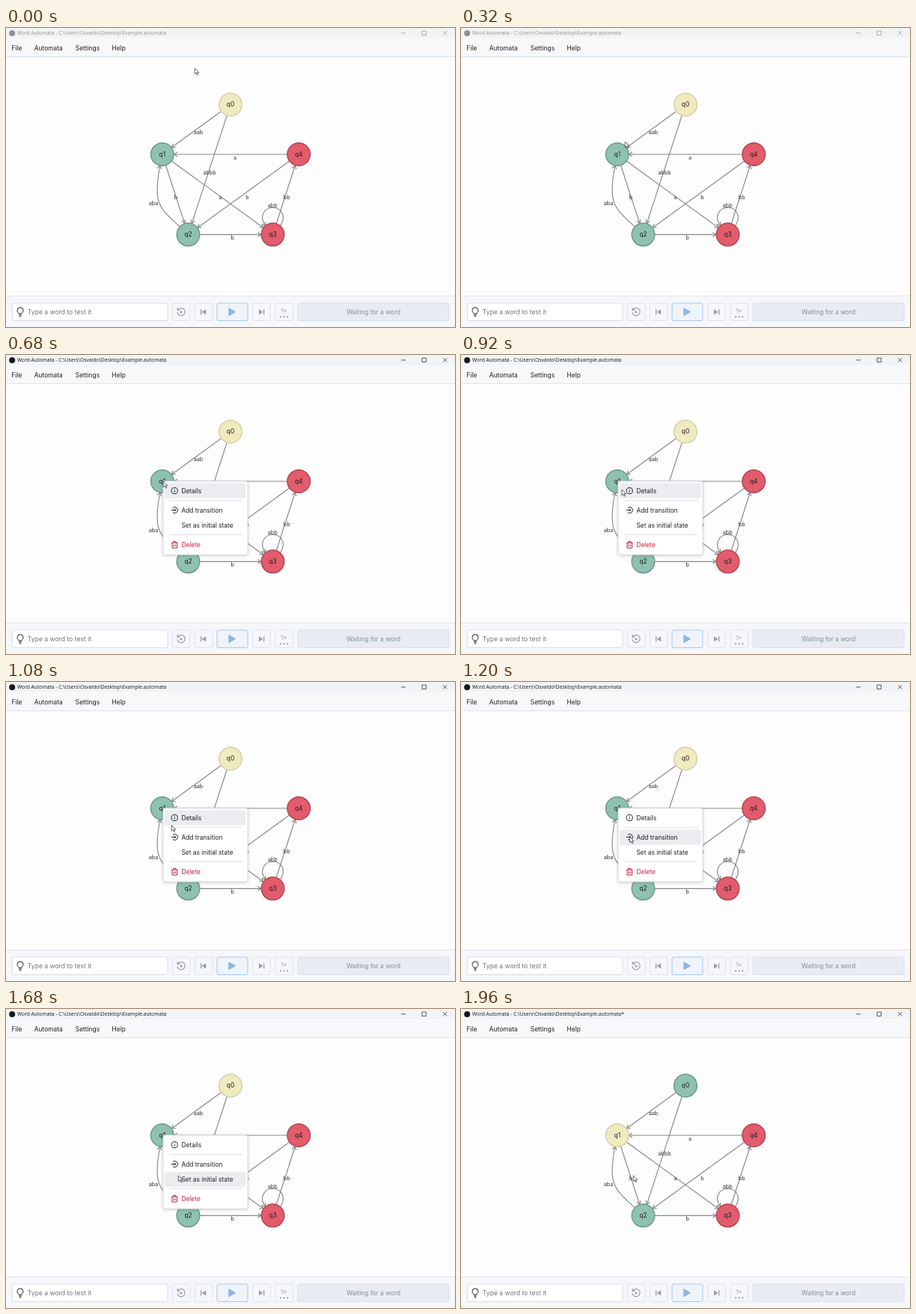
These frames come from a looping animation (600x400 px, 2120 ms). An HTML page:

```html
<!DOCTYPE html>
<html lang="en">
<head>
<meta charset="utf-8">
<title>Word Automata</title>
<style>
  html, body { margin: 0; width: 100%; height: 100%; overflow: hidden; background: #fefdfe; }
  svg { display: block; width: 600px; height: 400px; font: 8.4px Inter, sans-serif; fill: none; }
  text { fill: #1c1e21; }
  .mid { text-anchor: middle; }
  .bar { fill: #f2f3f5; color: #8f9092; }
  .bar.active { color: #17181a; }
  .bar text { font: 6.72px "Open Sans", "Noto Sans", sans-serif; fill: currentColor; }
  .ctl { stroke: currentColor; stroke-width: .7; fill: none; }
  .btn { fill: #f6f7fa; stroke: #dfe3e9; }
  .off { stroke: #989ca3; }
  .dim { fill: #989ca3; }
  .edge { stroke: #87878a; stroke-width: 1.15; }
  .label { font-size: 7.3px; fill: #303236; text-anchor: middle; }
  .node { stroke-width: 1.5; }
  .initial { fill: #f0ebbe; stroke: #d5cfa9; }
  .plain { fill: #8fc1b2; stroke: #6b9a8b; }
  .final { fill: #e25c6b; stroke: #b54554; }
  .icon { stroke: #202226; stroke-width: 1; }
  .red { stroke: #c51f3c; }
  text.red { fill: #c51f3c; stroke: none; }
  .panel { fill: #fff; stroke: #d3d6dc; stroke-width: .8; filter: drop-shadow(0 1px 2px rgba(40, 45, 55, .22)); }
  .rule { stroke: #dcdee3; stroke-width: .9; }
</style>
</head>
<body>
<svg viewBox="0 0 600 400">
  <rect width="600" height="400" fill="#fefdfe"/>

  <g class="bar" id="bar">
    <rect width="600" height="13.5"/>
    <circle cx="8.2" cy="7" r="4" fill="currentColor"/>
    <text id="title" x="15" y="9.4"></text>
    <path class="ctl" d="M528 6.8h6M556 4h5.4v5.4h-5.4zM584 4l5.4 5.4M589.4 4l-5.4 5.4"/>
  </g>

  <rect y="13.5" width="600" height="25" fill="#f6f8fa"/>
  <path d="M0 38.5H600" stroke="#dde3ea"/>
  <text x="7.5" y="30.4">File</text>
  <text x="37.8" y="30.4">Automata</text>
  <text x="92.8" y="30.4">Settings</text>
  <text x="141.6" y="30.4">Help</text>

  <g id="graph"></g>

  <g id="menu">
    <rect class="panel" x="210" y="168.8" width="113" height="98.4" rx="2.5"/>
    <rect id="hover" x="212" width="108.5" height="20.4" rx="2.5" fill="#ebecf0"/>
    <path class="rule" d="M219 194.5h97M219 240.5h97"/>
    <g class="icon">
      <circle cx="225.2" cy="181.6" r="4.1"/>
      <path d="M225.2 181v2.6M225.2 179.2v.9"/>
      <path d="M223 204.4a4 4 0 1 1 0 6.2M220.8 207.5h6M225 205.6l1.9 1.9-1.9 1.9"/>
      <path class="red" d="M221 251.3h8.6M223.5 251v-1.5h3.6v1.5M222 251.5v6.7h6.6v-6.7M224.2 253.4v3M226.4 253.4v3"/>
    </g>
    <text x="234.4" y="184.5">Details</text>
    <text x="234.4" y="210.5">Add transition</text>
    <text x="234.4" y="230.9">Set as initial state</text>
    <text class="red" x="234.4" y="257">Delete</text>
  </g>

  <rect y="358" width="600" height="42" fill="#f5f7fa"/>
  <path d="M0 358.5H600" stroke="#dfe4ea"/>
  <rect x="8.5" y="368" width="207.5" height="23.5" rx="2" fill="#fff" stroke="#d9dee5"/>
  <g class="icon">
    <path d="M17 382.2c0-1.3-2-2-2-4.4a4 4 0 0 1 8 0c0 2.4-2 3.1-2 4.4z"/>
    <path d="M17.2 384h3.6M17.7 385.8h2.6"/>
  </g>
  <text x="28.8" y="382.6" style="font-size:8.6px;fill:#6d727a">Type a word to test it</text>

  <g class="btn">
    <rect x="222.5" y="368" width="23.5" height="23.5" rx="2"/>
    <rect x="252.5" y="368" width="23.5" height="23.5" rx="2"/>
    <rect x="329.8" y="368" width="23.5" height="23.5" rx="2"/>
    <rect x="360" y="368" width="23.5" height="23.5" rx="2"/>
  </g>
  <rect x="282" y="368" width="41" height="23.5" rx="2" fill="#eff4fb" stroke="#a9c6ea"/>
  <path d="M297.8 374.8v10l8.8-5z" fill="#8fb4e3" stroke="#8fb4e3" stroke-linejoin="round"/>
  <path class="off" d="M229.6 377.2a5.1 5.1 0 1 1-.6 3.2M229.2 373.9v3.6h3.6" stroke-width="1.2"/>
  <g class="dim">
    <circle cx="234" cy="380" r="1.6"/>
    <path d="M260 376.3h1.3v7.2h-1.3zM267.2 376.3v7.2l-5.4-3.6z"/>
    <path d="M344 376.3h1.3v7.2h-1.3zM338 376.3v7.2l5.4-3.6z"/>
    <circle cx="367" cy="386.4" r="1.1"/>
    <circle cx="371.6" cy="386.4" r="1.1"/>
    <circle cx="376.2" cy="386.4" r="1.1"/>
  </g>
  <text class="mid dim" x="371.3" y="381.2" style="font-size:8px;fill:#989ca3">1×</text>
  <rect x="390" y="368" width="202" height="23.5" rx="2" fill="#e8ecf2" stroke="#d9dfe7"/>
  <text class="mid" x="491" y="382.7" style="fill:#858a92">Waiting for a word</text>

  <path id="cursor" d="M0 0v7.6l1.8-1.5 1.3 2.9 1.3-.6-1.3-2.7h2.4z" fill="#fff" stroke="#33353a" stroke-width=".75" stroke-linejoin="round"/>
</svg>

<script>
const LOOP = 2120, STEP = 40;
const FOCUS = 600, MENU_OPEN = 640, MENU_CLOSE = 1800;
const TITLE = "Word Automata - C:\\Users\\Osvaldo\\Desktop\\Example.automata";

const $ = id => document.getElementById(id);
const graph = $("graph");

function add(tag, attrs, text = "") {
  const el = document.createElementNS("http://www.w3.org/2000/svg", tag);
  for (const key in attrs) el.setAttribute(key, attrs[key]);
  el.textContent = text;
  return graph.appendChild(el);
}

// Open arrowhead with its tip at x, y, pointing along angle
function arrow(x, y, angle) {
  const leg = turn => `${x - 5.2 * Math.cos(angle + turn)} ${y - 5.2 * Math.sin(angle + turn)}`;
  add("path", { class: "edge", d: `M${leg(0.6)}L${x} ${y}L${leg(-0.6)}` });
}

const states = {
  q0: [300, 102.5, "initial"],
  q1: [208.8, 169, "plain"],
  q2: [243.5, 276.3, "plain"],
  q3: [356.5, 276.3, "final"],
  q4: [391.2, 169, "final"]
};

const edges = [
  ["q0", "q1"], ["q0", "q2"], ["q4", "q1"], ["q1", "q3"],
  ["q1", "q2"], ["q4", "q2"], ["q2", "q3"], ["q3", "q4"]
];

for (const [from, to] of edges) {
  const [x1, y1] = states[from], [x2, y2] = states[to];
  const angle = Math.atan2(y2 - y1, x2 - x1);
  const x = x2 - 15.8 * Math.cos(angle), y = y2 - 15.8 * Math.sin(angle);
  add("path", { class: "edge", d: `M${x1} ${y1}L${x} ${y}` });
  arrow(x, y, angle);
}
add("path", { class: "edge", d: "M232 265.5C216 251 203 241 202.2 221C201.7 207 203.4 196 206 184" });
arrow(206, 184, -1.33);
add("path", { class: "edge", d: "M366.5 264.5C376 250 366 240.3 356.5 240.3C347 240.3 337 250 346.5 264.5" });
arrow(346.5, 264.5, 1);

const labels = [
  ["aab", 257, 139.5], ["a", 306, 173], ["abbb", 272, 193], ["b", 227, 226],
  ["a", 286.3, 226], ["b", 322.5, 226], ["bb", 375.2, 226],
  ["abb", 356.3, 237], ["aba", 197, 234.3], ["b", 302.7, 280]
];
for (const [text, x, y] of labels) add("text", { class: "label", x, y: y + 2.5 }, text);

const discs = {};
for (const name in states) {
  const [cx, cy, kind] = states[name];
  discs[name] = add("circle", { class: "node " + kind, cx, cy, r: 15.3 });
  add("text", { class: "mid", x: cx, y: cy + 2.9 }, name);
}

// Pointer path: time, x, y
const path = [
  [0, 252.3, 53.8], [40, 251.5, 56], [120, 244, 80], [240, 227, 131], [320, 219.3, 152],
  [440, 212, 165], [560, 210.3, 169], [760, 210.3, 169], [920, 215, 180], [1080, 221.3, 191.5],
  [1200, 225.5, 207], [1360, 228.5, 215], [1520, 230, 221], [1680, 230.3, 222.8], [LOOP, 230.3, 222.8]
];

function pointer(t) {
  const i = path.findIndex(p => p[0] > t);
  const [t0, x0, y0] = path[i - 1], [t1, x1, y1] = path[i];
  const k = (t - t0) / (t1 - t0);
  return [x0 + (x1 - x0) * k, y0 + (y1 - y0) * k];
}

function paint(now) {
  const t = Math.floor(now % LOOP / STEP) * STEP;
  const [x, y] = pointer(t);
  const changed = t >= MENU_CLOSE;
  $("cursor").setAttribute("transform", `translate(${x} ${y})`);
  $("bar").classList.toggle("active", t >= FOCUS);
  $("title").textContent = TITLE + (changed ? "*" : "");
  $("menu").style.display = t >= MENU_OPEN && !changed ? "" : "none";
  $("hover").setAttribute("y", y < 195 ? 171.4 : y < 218 ? 197.4 : 217.8);
  discs.q0.setAttribute("class", "node " + (changed ? "plain" : "initial"));
  discs.q1.setAttribute("class", "node " + (changed ? "initial" : "plain"));
}

function tick() {
  paint(performance.now());
  requestAnimationFrame(tick);
}
tick();
</script>
</body>
</html>
```
